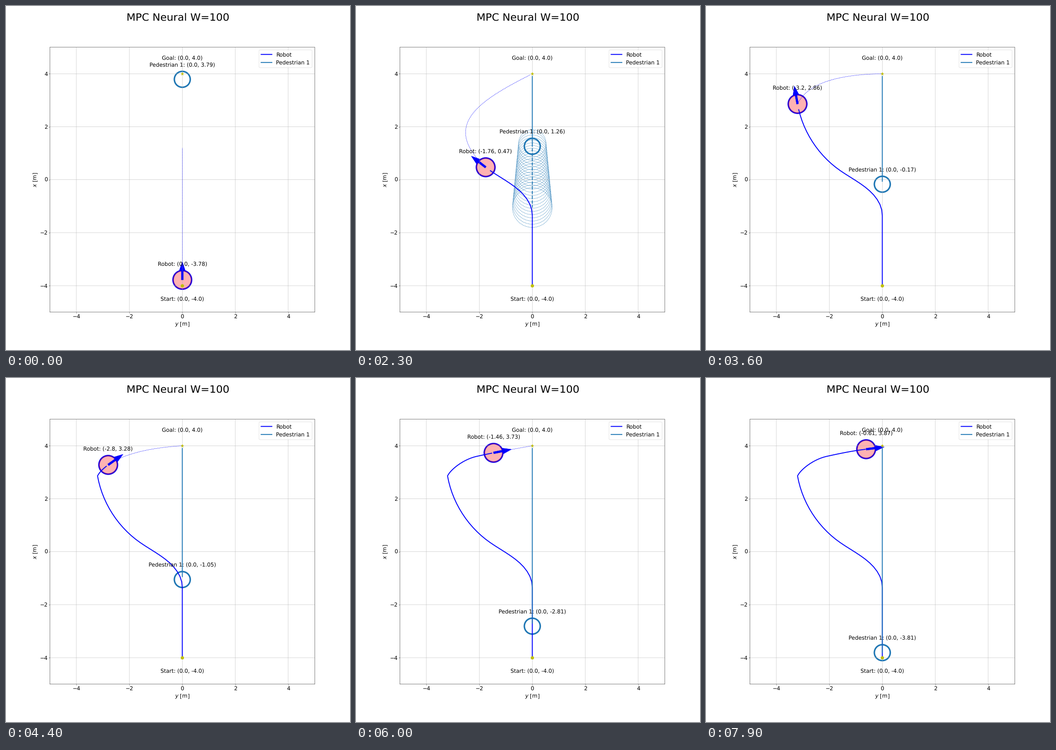
A matplotlib script for the animation above (8000 ms loop, 748 px wide and 748 px high).

```python
import numpy as np
import matplotlib.pyplot as plt
from matplotlib.animation import FuncAnimation
from matplotlib.patches import Circle, FancyArrow

plt.rcParams.update({"font.family": "DejaVu Sans", "font.size": 18,
                     "text.hinting": "none", "path.snap": False})

N = 80
GOAL = np.array([0.0, 4.0])
START = np.array([0.0, -4.0])
R_ROBOT, R_PED = 0.35, 0.30
V_ROBOT, V_PED = 0.22, 0.11   # metres per step
SWERVE, TURN = 11, 36         # steps where avoidance begins and ends
SENSE = 4.0                   # pedestrian is predicted inside this range
HORIZON = 5.0                 # longest plan drawn

# step, lateral, forward, heading in degrees, speed
WAYPOINTS = np.array([
    (-1, 0, -4.0, 0, V_ROBOT),
    (SWERVE, 0, -1.36, 0, V_ROBOT),
    (13, -0.09, -0.93, -25, V_ROBOT),
    (23, -1.76, 0.47, -52, V_ROBOT),
    (TURN, -3.2, 2.86, -10, V_ROBOT),
    (TURN, -3.2, 2.86, 25, 0.05),
    (52, -2.1, 3.6, 77.5, 0.097),
    (79, -0.61, 3.87, 83, 0.032)])


def robot_at(t):
    """Hermite curve through the waypoints."""
    steps = WAYPOINTS[:, 0]
    i = int(np.clip(np.searchsorted(steps, t) - 1, 0, len(steps) - 2))
    (t0, *p0, a0, v0), (t1, *p1, a1, v1) = WAYPOINTS[i:i + 2]
    h = t1 - t0
    s = (t - t0) / h
    blend = s * s * (3 - 2 * s)
    return ((1 - blend) * np.array(p0) + blend * np.array(p1)
            + s * (1 - s)**2 * h * v0 * compass(a0)
            - s**2 * (1 - s) * h * v1 * compass(a1))


def compass(deg):
    a = np.radians(deg)
    return np.array([np.sin(a), np.cos(a)])


def direction(t0, t1):
    d = robot_at(t1) - robot_at(t0)
    return d / np.hypot(*d)


def ped_at(k):
    return max(3.79 - V_PED * k, -3.81)


def plan_at(k):
    pos = robot_at(k)
    dist = np.hypot(*(GOAL - pos))
    s = np.linspace(0, 1, 240)[:, None]
    if SWERVE <= k < TURN:
        # loop round the pedestrian, arriving from ever further ahead
        swing = k - 27
        c1 = pos + 0.6 * dist * direction(k, min(k + 3, TURN))
        c2 = GOAL + (0.03 * swing - 1.86, 0.25 * swing)
        curve = ((1 - s)**3 * pos + 3 * s * (1 - s)**2 * c1
                 + 3 * s**2 * (1 - s) * c2 + s**3 * GOAL)
    else:
        c = pos + 0.36 * dist * direction(k, k + 0.1)
        curve = (1 - s)**2 * pos + 2 * s * (1 - s) * c + s**2 * GOAL
    length = np.cumsum(np.hypot(*np.diff(curve, axis=0, prepend=curve[:1]).T))
    return curve[length <= HORIZON].T


def caption(name, x, y):
    return f"{name}: ({round(float(x), 2) + 0.0}, {round(float(y), 2) + 0.0})"


def label(x, y, text=""):
    return ax.text(x, y, text, ha="center", va="center")


fig, ax = plt.subplots(figsize=(16, 16), dpi=46.75)
fig.suptitle("MPC Neural W=100", fontsize=35, y=0.979)
ax.set(xlim=(-5, 5), ylim=(-5, 5), aspect="equal",
       xticks=range(-4, 5, 2), yticks=range(-4, 5, 2),
       xlabel="$y$ [m]", ylabel="$x$ [m]")
ax.grid(True)

robot_line, = ax.plot([], [], "b-", lw=3, label="Robot")
ped_line, = ax.plot([], [], "C0-", lw=3, label="Pedestrian 1")
plan_line, = ax.plot([], [], "b--", lw=1)
ped_plan, = ax.plot([], [], "C0--", lw=3)
ax.plot(*START, "yo", ms=10, zorder=3)
ax.plot(*GOAL, "y*", ms=10, zorder=3)
ax.legend(loc="upper right")

label(0, START[1] - 0.5, caption("Start", *START))
label(0, GOAL[1] + 0.6, caption("Goal", *GOAL))
robot_text, ped_text = label(0, 0), label(0, 0)

ped_ring = ax.add_patch(Circle((0, 0), R_PED, fill=False, ec="C0", lw=5))
robot_ring = ax.add_patch(Circle((0, 0), R_ROBOT, fill=False, ec="b", lw=5))
robot_body = ax.add_patch(Circle((0, 0), R_ROBOT, color="r", alpha=0.3))
arrow = ax.add_patch(FancyArrow(0, 0, 0, R_ROBOT, width=0.075, color="b"))

# predicted pedestrian, counted from its previous position
ahead = V_PED * np.arange(-1, 22)
halos = [ax.add_patch(Circle((0, 0), r, fill=False, ec="C0", ls="--", lw=1))
         for r in np.linspace(0.52, 0.75, len(ahead))]

trail = np.array([robot_at(k) for k in range(-1, N)])
ped_trail = np.array([ped_at(k) for k in range(-1, N)])


def update(k):
    pos, ped = trail[k + 1], ped_trail[k + 1]
    robot_line.set_data(*trail[:k + 1].T)
    ped_line.set_data(np.zeros(k + 1), ped_trail[:k + 1])
    plan_line.set_data(*plan_at(k))

    robot_ring.center = robot_body.center = tuple(pos)
    ped_ring.center = (0, ped)
    dx, dy = R_ROBOT * direction(k - 0.1, k)
    arrow.set_data(x=pos[0], y=pos[1], dx=dx, dy=dy)

    robot_text.set_position((pos[0], pos[1] + 0.6))
    robot_text.set_text(caption("Robot", *pos))
    ped_text.set_position((0, ped + 0.55))
    ped_text.set_text(caption("Pedestrian 1", 0, ped))

    near = bool(np.hypot(pos[0], pos[1] - ped) < SENSE)
    ped_plan.set_data(np.zeros(len(ahead)), ped - ahead)
    ped_plan.set_visible(near)
    for halo, d in zip(halos, ahead):
        halo.center = (0, ped - d)
        halo.set_visible(near)
    return []


anim = FuncAnimation(fig, update, frames=N, interval=100, repeat=True,
                     repeat_delay=0)
plt.show()
```
